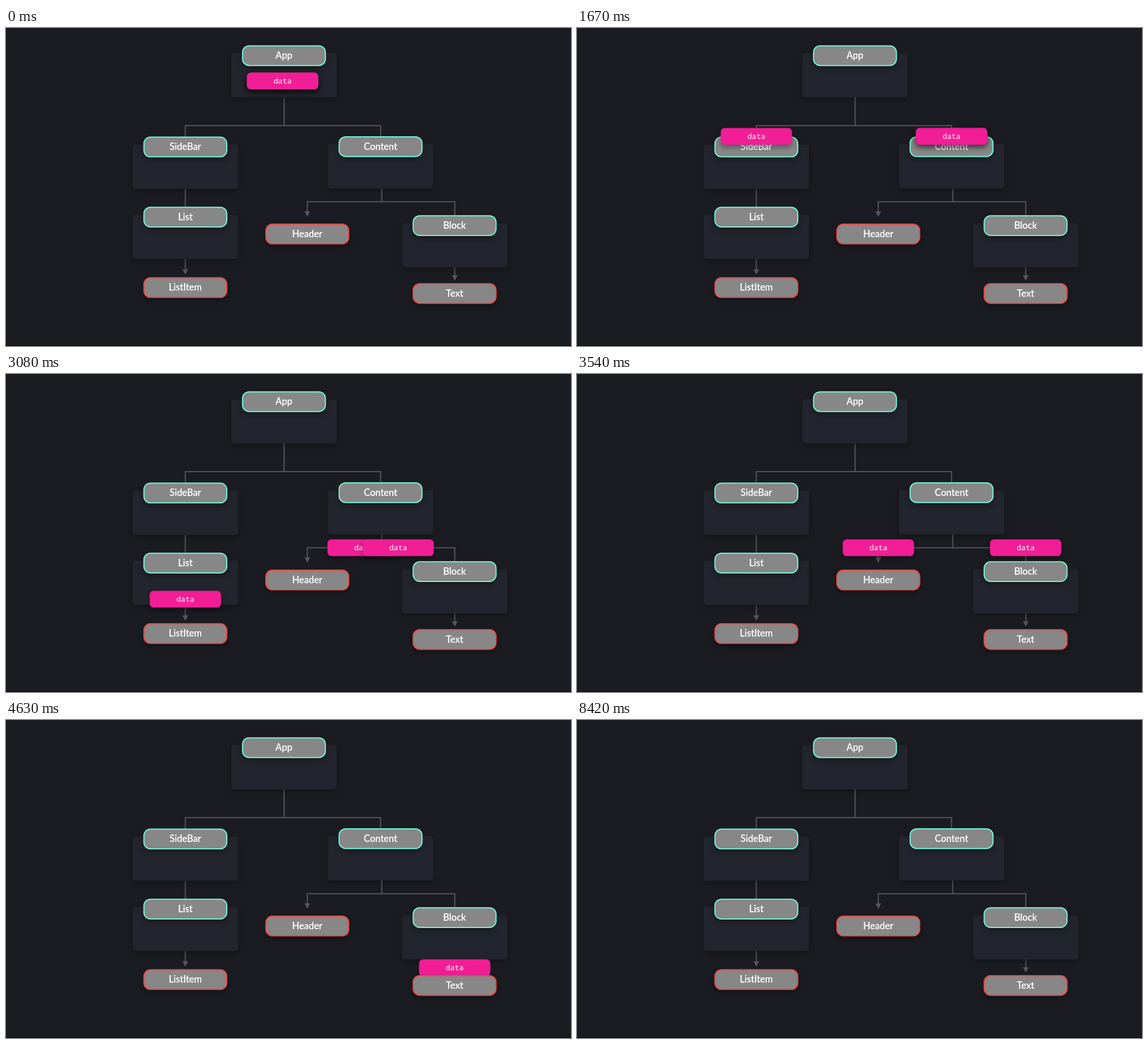
An HTML page for the animation above (10000 ms loop, 998 by 561 pixels).

```html
<!DOCTYPE html>
<html lang="en">
<head>
<meta charset="utf-8">
<title>Data flowing down a component tree</title>
<style>
  html, body { margin: 0; width: 100%; height: 100%; overflow: hidden; background: #1b1c21; }
  svg { display: block; width: 998px; height: 561px; }
  text { fill: #fff; text-anchor: middle; }

  .wires { fill: none; stroke: #55565a; stroke-width: 2; }
  .heads { fill: #55565a; }
  .slots { fill: #22252d; filter: drop-shadow(0 4px 4px rgba(0, 0, 0, .28)); }
  .node { fill: #878787; stroke-width: 2; filter: drop-shadow(0 4px 4px rgba(0, 0, 0, .35)); }
  .branch { stroke: #74f5d8; }
  .leaf { stroke: #f04545; }
  .labels { font: 500 16.5px Lato, sans-serif; stroke: #fff; stroke-width: .25; }

  #data rect { fill: #f11e96; }
  #data text { font: 500 13.3px "Noto Sans Mono", monospace; }
  .tag {
    filter: drop-shadow(0 4px 5px rgba(0, 0, 0, .38));
    animation: 10s ease-in-out infinite;
  }
  .to-item { animation-name: to-item; }
  .to-header { animation-name: to-header; }
  .to-text { animation-name: to-text; }

  /* every leg of a route takes 702 ms */
  @keyframes to-item {
    0%, .36% { transform: translate(488.6px, 93.5px); }
    7.38%  { transform: translate(488.6px, 172.5px); }
    14.4%  { transform: translate(316.8px, 172.5px); }
    21.42% { transform: translate(316.8px, 255.2px); }
    28.44% { transform: translate(316.8px, 378.3px); }
    35.46% { transform: translate(316.8px, 458px); opacity: 1; }
    35.47%, 100% { transform: translate(316.8px, 458px); opacity: 0; }
  }
  @keyframes to-header {
    0%, .36% { transform: translate(488.6px, 93.5px); }
    7.38%  { transform: translate(488.6px, 172.5px); }
    14.4%  { transform: translate(661.5px, 172.5px); }
    21.42% { transform: translate(661.5px, 254.7px); }
    28.44% { transform: translate(661.5px, 306.5px); }
    35.46% { transform: translate(532.3px, 306.5px); }
    42.48% { transform: translate(532.3px, 363.5px); opacity: 1; }
    42.49%, 100% { transform: translate(532.3px, 363.5px); opacity: 0; }
  }
  @keyframes to-text {
    0%, .36% { transform: translate(488.6px, 93.5px); }
    7.38%  { transform: translate(488.6px, 172.5px); }
    14.4%  { transform: translate(661.5px, 172.5px); }
    21.42% { transform: translate(661.5px, 254.7px); }
    28.44% { transform: translate(661.5px, 306.5px); }
    35.46% { transform: translate(792.5px, 306.5px); }
    42.48% { transform: translate(792.5px, 394px); }
    49.5%  { transform: translate(792.5px, 468.3px); opacity: 1; }
    49.51%, 100% { transform: translate(792.5px, 468.3px); opacity: 0; }
  }
</style>
</head>
<body>
<svg viewBox="0 0 998 561">
  <defs>
    <rect id="slot" x="-93" width="186" height="78" rx="5"/>
    <rect id="node" x="-73.2" y="-17.4" width="146.4" height="34.8" rx="11.5"/>
    <path id="head" d="M-5 -9.5H5L0 0Z"/>
    <g id="data">
      <rect x="-63" y="-14.8" width="126" height="29.6" rx="7"/>
      <text y="4.6">data</text>
    </g>
  </defs>

  <rect width="998" height="561" fill="#1b1c21"/>
  <rect y="560" width="998" height="1" fill="#050506"/>

  <g class="wires">
    <path d="M491.2 122V172.3M316.7 193V172.3H661.7V193"/>
    <path d="M316.7 283V317M316.7 406V427"/>
    <path d="M663.7 282V306.5M532.2 325V306.5H792.7V332M792.7 421V438"/>
  </g>
  <g class="heads">
    <use href="#head" x="316.7" y="435.3"/>
    <use href="#head" x="532.2" y="333"/>
    <use href="#head" x="792.7" y="445.7"/>
  </g>

  <g class="slots">
    <use href="#slot" x="491" y="44.4"/>
    <use href="#slot" x="316.8" y="205.7"/>
    <use href="#slot" x="661.6" y="205"/>
    <use href="#slot" x="316.8" y="329.2"/>
    <use href="#slot" x="792.5" y="344.3"/>
  </g>

  <g class="node branch">
    <use href="#node" x="491" y="48.8"/>
    <use href="#node" x="316.8" y="209.9"/>
    <use href="#node" x="661.6" y="209.3"/>
    <use href="#node" x="316.8" y="333.6"/>
    <use href="#node" x="792.4" y="348.6"/>
  </g>
  <g class="labels">
    <text x="491" y="54.2">App</text>
    <text x="316.8" y="215.3">SideBar</text>
    <text x="661.6" y="214.8">Content</text>
    <text x="316.8" y="339">List</text>
    <text x="792.4" y="354">Block</text>
  </g>

  <g class="tag to-item"><use href="#data"/></g>
  <g class="tag to-header"><use href="#data"/></g>
  <g class="tag to-text"><use href="#data"/></g>

  <g class="node leaf">
    <use href="#node" x="316.8" y="457.9"/>
    <use href="#node" x="532.2" y="363.4"/>
    <use href="#node" x="792.4" y="468.3"/>
  </g>
  <g class="labels">
    <text x="316.8" y="463.2">ListItem</text>
    <text x="532.2" y="368.9">Header</text>
    <text x="792.4" y="473.8">Text</text>
  </g>
</svg>
</body>
</html>
```
